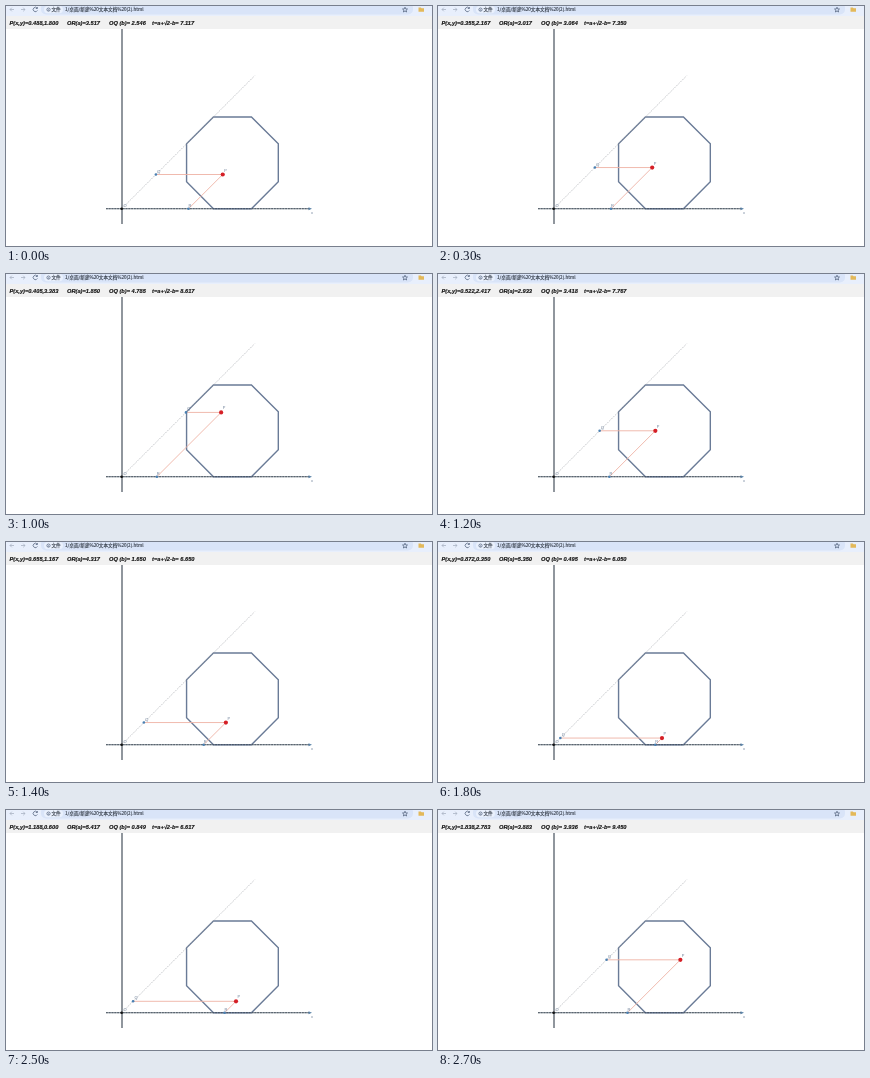
These frames come from a looping animation (426 px wide and 240 px high, 2800 ms). An HTML page:

```html
<!DOCTYPE html>
<html lang="zh">
<head>
<meta charset="utf-8">
<title>Octagon</title>
<style>
html, body { margin: 0; width: 100%; height: 100%; overflow: hidden; background: #fff; }
svg { display: block; width: 426px; height: 240px; }
.ui { font: 4.6px "Noto Sans CJK SC", "Noto Sans CJK", "Open Sans", sans-serif; fill: #2f3743; stroke: #2f3743; stroke-width: .12; }
.info { font: italic bold 5.7px "Liberation Sans", Arial, sans-serif; fill: #161616; stroke: #161616; stroke-width: .15; white-space: pre; }
.label { font: 4px "Liberation Sans", Arial, sans-serif; fill: #6a7d96; }
.icon { fill: none; stroke: #4a5a75; stroke-width: .7; }
.pale { stroke: #a3adbd; }
.axis { stroke: #46505c; stroke-width: 1.2; }
.base { stroke: #7d8894; stroke-width: 1.1; }
.ticks { stroke: #39434f; stroke-width: .8; stroke-dasharray: 1.8 1; }
.dash { stroke: #a3a6ac; stroke-width: .6; stroke-dasharray: 1.8 1; }
.shape { fill: none; stroke: #6a7b97; stroke-width: 1.4; }
.link { fill: none; stroke: #efb3a5; stroke-width: .9; }
.dot { fill: #4a80b2; }
</style>
</head>
<body>
<svg viewBox="0 0 426 240">
  <rect width="426" height="10" fill="#e8effc"/>
  <rect x="35" y="-3" width="372" height="11.5" rx="5" fill="#d9e4f8"/>
  <rect x="38" y="0" width="19" height="7.2" rx="3.6" fill="#eaf1fd"/>
  <path class="icon pale" d="M8 3.5H4M5.8 1.7L4 3.5L5.8 5.3M15 3.5H19M17.2 1.7L19 3.5L17.2 5.3"/>
  <path class="icon" d="M31.2 2.2A2.2 2.2 0 1 0 31.4 4.4M31.4 1V2.5H29.8"/>
  <circle class="icon" cx="42.5" cy="3.6" r="1.6"/>
  <path class="icon" d="M42.5 3.4V4.5M399 1.2L399.7 2.9L401.5 3L400.1 4.2L400.6 6L399 5L397.4 6L397.9 4.2L396.5 3L398.3 2.9Z"/>
  <path d="M412.5 1.4H414.8L415.6 2.2H418V5.8H412.5Z" fill="#e3b95a"/>
  <text class="ui" x="45.5" y="5.3">文件</text>
  <text class="ui" x="59" y="5.3">1/桌面/新建%20文本文档%20(2).html</text>
  <rect y="10" width="426" height="13" fill="#f1f1f1"/>
  <g class="info">
    <text id="pos" x="3.5" y="18.8"></text>
    <text id="a" x="61" y="18.8"></text>
    <text id="b" x="103" y="18.8"></text>
    <text id="t" x="146" y="18.8"></text>
  </g>

  <path class="axis" d="M116 23V218"/>
  <path class="base" d="M100 202.7H304"/>
  <path class="shape" id="octagon"/>
  <path class="ticks" d="M100 202.7H304"/>
  <path d="M302.5 201.2L306 202.7L302.5 204.2Z" fill="#5a82a8"/>
  <text class="label" x="305" y="207.5">x</text>
  <path class="dash" d="M115.7 202.7L248.7 69.7"/>
  <path class="link" id="link"/>
  <circle cx="115.7" cy="202.7" r="1.3" fill="#111"/>
  <text class="label" x="117.5" y="201">O</text>
  <g id="Q"><circle class="dot" r="1.3"/><text class="label" x="1.4" y="-2">Q</text></g>
  <g id="R"><circle class="dot" r="1.3"/><text class="label" x="0" y="-2">R</text></g>
  <g id="P"><circle r="2.1" fill="#d51f26"/><text class="label" x="1.5" y="-3">P</text></g>
</svg>
<script>
const $ = id => document.getElementById(id);
const OX = 115.7, OY = 202.7, UNIT = 19, GRID = 60, STEP = 100, LOOP = 2800;
const SQ2 = Math.SQRT2, START = 2 + 2 * SQ2;

// Dragged point: ms, x, y in 1/60 units
const path = [
  [0, 319, 108], [600, 306, 155], [1000, 314, 203], [1400, 329, 70],
  [1800, 342, 21], [2100, 349, 7], [2300, 350, 2], [2400, 351, 4], [2700, 400, 167]
];

const px = (x, y) => [OX + x * UNIT, OY - y * UNIT];

const corners = [];
for (let i = 0, x = START, y = 0; i < 8; i++) {
  corners.push(px(x, y));
  x += 2 * Math.cos(i * Math.PI / 4);
  y += 2 * Math.sin(i * Math.PI / 4);
}
$("octagon").setAttribute("d", "M" + corners.join("L") + "Z");

const grade = (i, k) => (path[i + 1][k] - path[i][k]) / (path[i + 1][0] - path[i][0]);

// Monotone slope at a knot
function slope(i, k) {
  if (i === 0) return grade(0, k);
  if (i === path.length - 1) return grade(i - 1, k);
  const l = grade(i - 1, k), r = grade(i, k);
  return l * r > 0 ? 2 * l * r / (l + r) : 0;
}

function sample(time, k) {
  let i = 0;
  while (i < path.length - 2 && time > path[i + 1][0]) i++;
  const h = path[i + 1][0] - path[i][0], u = (time - path[i][0]) / h, v = 1 - u;
  const value = v * v * (1 + 2 * u) * path[i][k] + u * u * (3 - 2 * u) * path[i + 1][k]
    + h * u * v * (v * slope(i, k) - u * slope(i + 1, k));
  return Math.round(value) / GRID;
}

function place(id, p) {
  $(id).setAttribute("transform", `translate(${p})`);
}

function draw(time) {
  const x = sample(time, 1), y = sample(time, 2), a = x - y;
  const P = px(x, y), Q = px(y, y), R = px(a, 0);
  place("P", P);
  place("Q", Q);
  place("R", R);
  $("link").setAttribute("d", `M${Q}L${P}L${R}`);
  $("pos").textContent = `P(x,y)=${(x - START).toFixed(3)},${y.toFixed(3)}`;
  $("a").textContent = `OR(a)=${a.toFixed(3)}`;
  $("b").textContent = `OQ (b)= ${(y * SQ2).toFixed(3)}`;
  $("t").textContent = `t=a+√2·b= ${(a + 2 * y).toFixed(3)}`;
}

const begin = performance.now();
function tick() {
  const time = (performance.now() - begin) % LOOP;
  draw(Math.floor(time / STEP) * STEP);
  requestAnimationFrame(tick);
}
tick();
</script>
</body>
</html>
```
